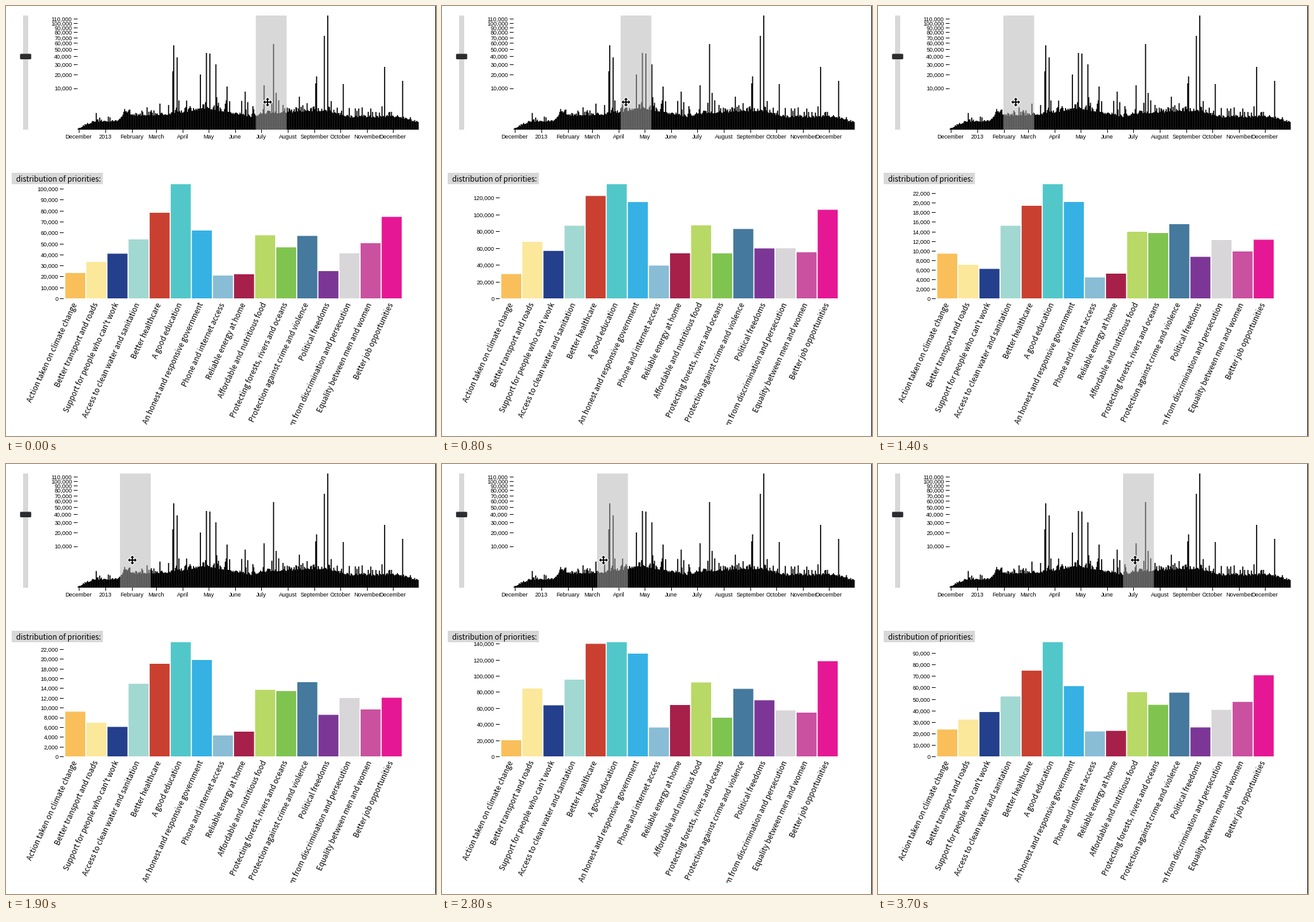
These frames come from a looping animation (679 px wide and 678 px high, 3.8 s). A matplotlib script:

```python
import numpy as np
import matplotlib.pyplot as plt
from matplotlib.animation import FuncAnimation
from matplotlib.patches import FancyBboxPatch, Polygon, Rectangle

W, H, DPI = 679, 678, 64
PX = 72 / DPI
FRAMES, INTERVAL = 38, 100
GREY = "#d8d8d8"
AXIS_FONT, LABEL_FONT = "Liberation Sans", "Noto Sans CJK JP"

# Timeline: votes per day on a power scale
TIME_TOP, TIME_BASE, EXPONENT, TEN_K = 15, 195, 0.41, 65.5
DAY_W, DAY_X0, DAYS = 1.359, 114, 396
BRUSH_W = 48.6
TREND = [(113, 1), (140, 12), (180, 13), (188, 28), (195, 21), (255, 23), (318, 33),
         (385, 19), (415, 25), (505, 29), (540, 19), (620, 19), (652, 10)]
SPIKES = [(263, 92), (265, 133), (270, 114), (307, 87), (317, 121), (322.5, 120),
          (332, 103), (349, 68), (377, 60), (408, 70), (423, 135), (427, 58), (489, 73),
          (491, 84), (503, 148), (507.5, 180), (532, 72), (597.5, 99), (627, 77)]

# Priorities chart
BASE, FULL = 461, 180
BAR_X0, BAR_STEP, BAR_W = 93.6, 33.31, 31.6

# Largest total with the brush at each key position
KEY_X = np.array([198, 245, 340, 394])
KEY_PEAK = np.array([23900, 141700, 45100, 104000])

# Name, colour and bar height at the key positions
PRIORITIES = [
    ("Action taken on climate change", "#f9bf5a", (70.5, 25.5, 58.5, 40)),
    ("Better transport and roads", "#fce89b", (53, 107, 61, 57.5)),
    ("Support for people who can't work", "#243f8c", (46.5, 80.5, 66, 70.5)),
    ("Access to clean water and sanitation", "#a2d8d2", (114.5, 121, 104.5, 93)),
    ("Better healthcare", "#c94030", (146, 177.5, 136.5, 135)),
    ("A good education", "#52c7c9", (180, 180, 180, 180)),
    ("An honest and responsive government", "#36b1e4", (152, 162, 136, 107)),
    ("Phone and internet access", "#89bdd6", (33, 45.5, 61.5, 36)),
    ("Reliable energy at home", "#a6204a", (39, 81, 55.5, 38)),
    ("Affordable and nutritious food", "#b8d966", (105, 116.5, 113, 99.5)),
    ("Protecting forests, rivers and oceans", "#80c450", (103, 61, 86.5, 80.5)),
    ("Protection against crime and violence", "#45799d", (117, 106.5, 114, 98.5)),
    ("Political freedoms", "#7c3796", (65.5, 88.5, 63.5, 43)),
    ("Freedom from discrimination and persecution", "#d8d6d8", (92, 72.5, 89, 71)),
    ("Equality between men and women", "#ca51a0", (74, 69, 78.5, 87)),
    ("Better job opportunities", "#e61794", (92.5, 150, 123.5, 128.5)),
]

# Drag: out during the first half of the loop, back during the second
MOVE_T = np.array([0, 1, 5, 10, 14, 19])
BRUSH_PATH = np.array([394.5, 387, 340, 245, 198, 180])
CURSOR_PATH = np.array([413, 406, 350, 255, 217.5, 199.5])


def day_heights():
    rng = np.random.default_rng(12)
    heights = np.interp(day_x, *zip(*TREND))
    bumps = rng.exponential(3, DAYS) + (rng.random(DAYS) < 0.06) * rng.uniform(6, 22, DAYS)
    heights += bumps * np.minimum(1, heights / 20)
    for x, height in SPIKES:
        heights[np.argmin(abs(day_x - x))] = height
    return heights


def window_votes(x):
    inside = np.clip((day_x - x) / DAY_W + 0.5, 0, 1)
    inside *= np.clip((x + BRUSH_W - day_x) / DAY_W + 0.5, 0, 1)
    return (inside * votes).sum()


def glide(t, path):
    """Cubic Hermite curve through the points of a path."""
    slopes = np.gradient(path, MOVE_T)
    k = min(np.searchsorted(MOVE_T, t, side="right") - 1, len(MOVE_T) - 2)
    span = MOVE_T[k + 1] - MOVE_T[k]
    u = (t - MOVE_T[k]) / span
    ease = u * u * (3 - 2 * u)
    return ((1 - ease) * path[k] + ease * path[k + 1]
            + span * u * (1 - u) * ((1 - u) * slopes[k] - u * slopes[k + 1]))


def tick_step(peak, count=10):
    step = 10 ** np.floor(np.log10(peak / count))
    ratio = count * step / peak
    for limit, factor in ((0.15, 10), (0.35, 5), (0.75, 2)):
        if ratio <= limit:
            return step * factor
    return step


def box(x, y, w, h, color, **kw):
    return ax.add_patch(Rectangle((x, y), w, h, fc=color, lw=0, **kw))


def write(x, y, text, size, font=AXIS_FONT, **kw):
    return ax.text(x, y, text, fontsize=size * PX, family=font, color="black", **kw)


def value_tick(value, y, right):
    """Axis value with its dash; returns both artists."""
    label = write(right, y + 0.3, f"{value:,.0f}", 9.1, ha="right", va="center_baseline")
    dash, = ax.plot([right + 2.5, right + 7.5], [y, y], color="black", lw=PX)
    return [label, dash]


def four_arrows():
    arm = np.array([(-1, -1), (-1, -3.8), (-3, -3.8), (0, -7), (3, -3.8), (1, -3.8)])
    quarter = np.array([(0, 1), (-1, 0)])
    return np.vstack([arm @ np.linalg.matrix_power(quarter, k) for k in range(4)])


fig = plt.figure(figsize=(W / DPI, H / DPI), dpi=DPI, facecolor="white")
ax = fig.add_axes([0, 0, 1, 1])
ax.set_xlim(0, W)
ax.set_ylim(H, 0)
ax.axis("off")

# Timeline
day_x = DAY_X0 + DAY_W * np.arange(DAYS)
heights = day_heights()
votes = 1e4 * (heights / TEN_K) ** (1 / EXPONENT)
ax.bar(day_x, -heights, width=1.7, bottom=TIME_BASE, color="black", lw=0, snap=False)
for value in range(10000, 110001, 10000):
    value_tick(value, TIME_BASE - TEN_K * (value / 1e4) ** EXPONENT, 104.3)

names = ("December 2013 February March April May June July August "
         "September October November December").split()
months = np.arange("2012-12", "2014-01", dtype="datetime64[M]").astype("datetime64[D]")
for name, day in zip(names, (months - months[0]).astype(int)):
    x = 114.8 + DAY_W * day
    ax.plot([x, x], [TIME_BASE, TIME_BASE + 4], color="black", lw=PX)
    write(x, 209, name, 9.1, ha="center", va="baseline")

# Slider
box(27, TIME_TOP, 8, TIME_BASE - TIME_TOP, GREY)
ax.add_patch(FancyBboxPatch((23, 76.2), 16, 7, boxstyle="round,pad=0.8,rounding_size=1.5",
                            fc="#2b2c30", lw=0))

# Priorities
bars = []
for i, (name, color, _) in enumerate(PRIORITIES):
    x = BAR_X0 + BAR_STEP * i
    bars.append(box(x, BASE, BAR_W, 0, color, snap=False))
    write(x + 18.7, 470, name, 11.65, LABEL_FONT, rotation=65, rotation_mode="anchor",
          ha="right", va="baseline")
box(0, 659.5, W, 20, "white", zorder=4)
box(9, 263, 144, 17.7, GREY, zorder=5)
write(15.5, 277, "distribution of priorities:", 11.75, LABEL_FONT, va="baseline", zorder=6)
box(678, 0, 1, H, "black", zorder=6)

brush = box(0, TIME_TOP, BRUSH_W, TIME_BASE - TIME_TOP, "#b4b4b4", alpha=0.51,
            zorder=3, snap=False)
arrows = four_arrows()
cursor = [ax.add_patch(Polygon(arrows, fc="white", ec="white", lw=2.4 * PX, zorder=7)),
          ax.add_patch(Polygon(arrows, fc="black", lw=0, zorder=8))]
peak_scale = KEY_PEAK / [window_votes(x) for x in KEY_X]
ticks = []


def update(frame):
    t = min(frame, FRAMES - frame)
    x = glide(t, BRUSH_PATH)
    brush.set_x(x)
    for shape in cursor:
        shape.set_xy(arrows + (glide(t, CURSOR_PATH), 151.5))

    for bar, (_, _, key_heights) in zip(bars, PRIORITIES):
        height = np.interp(x, KEY_X, key_heights)
        bar.set_y(BASE - height)
        bar.set_height(height)

    while ticks:
        ticks.pop().remove()
    peak = window_votes(x) * np.interp(x, KEY_X, peak_scale)
    for value in np.arange(0, peak, tick_step(peak)):
        ticks.extend(value_tick(value, BASE - FULL * value / peak, 82.5))
    return [brush, *cursor, *bars, *ticks]


anim = FuncAnimation(fig, update, frames=FRAMES, interval=INTERVAL, repeat=True,
                     repeat_delay=0, blit=False)
plt.show()
```
